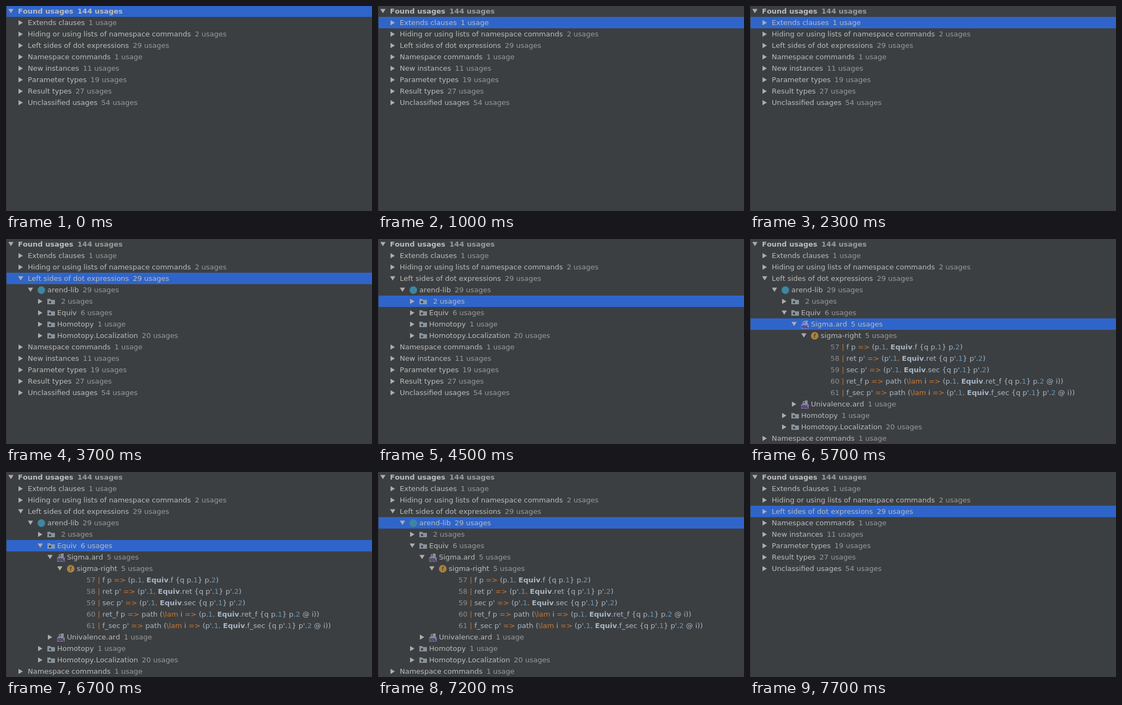
Animation, 673 px wide and 377 px high, one loop 8000 ms. Source, as an HTML page:

```html
<!DOCTYPE html>
<html lang="en">
<head>
<meta charset="utf-8">
<title>Found usages</title>
<style>
  html, body { margin: 0; width: 100%; height: 100%; overflow: hidden; background: #3c3f41; }
  #tree {
    position: absolute; inset: 0; overflow: hidden; box-sizing: border-box;
    border-left: 1px solid #323232;
    font: 13px/21px "DejaVu Sans", sans-serif; font-kerning: none;
    color: #bbb; white-space: pre;
  }
  .view { position: absolute; inset: -1px 0 0 -1px; visibility: hidden; }
  .row { position: relative; height: 21px; margin-left: 1px; }
  .row > * { position: absolute; top: 0; }
  .count { color: #999; margin-left: 3px; }
  .selected { background: #2f65ca; }
  .selected .count { color: #bbb; }
  .root { font-weight: bold; }
  svg { width: 16px; height: 21px; overflow: visible; }
  .code { color: #a9b7c6; }
  .line { color: #8c8c8c; }
  .key { color: #cc7832; }
  .num { color: #6897bb; }
</style>
</head>
<body>
<div id="tree"></div>
<script>
const LOOP = 8000;

const badge = (color, letter) =>
  `<circle cx="8" cy="11" r="7" fill="${color}"/>
   <text x="8" y="14.5" text-anchor="middle" font-size="10" fill="#2b2b2b">${letter}</text>`;

const icons = {
  library: '<circle cx="8" cy="11" r="7" fill="#3e86a0"/>',
  folder: `<path d="M1 6h5l2 2h7v8H1z" fill="#9aa7b0" fill-opacity=".8"/>
           <circle cx="6" cy="12" r="2" fill="#33383b"/>`,
  file: `<path d="M7 4 3 8h4zM8 4v5H3v2h10V4z" fill="#9aa7b0" fill-opacity=".8"/>
         <path d="M1 11h14v8H1z" fill="#b99bf8" fill-opacity=".6"/>
         <text x="8" y="17.6" text-anchor="middle" font-size="7" font-weight="bold" fill="#2b2530">IDL</text>`,
  func: badge('#aa8240', 'f'),
  record: badge('#3e86a0', 'c'),
};

// A node with a toggle key opens only while a step lists that key.
const node = (label, count, icon, kids = [], toggle = '') => ({ label, count, icon, kids, toggle });
const closed = (label, count, icon) => node(label, count, icon, [], '-');
const line = (number, code) => ({ number, code, kids: [] });

const root = node('Found usages', 144, '', [
  node('Extends clauses', 1, '', [
    node('arend-lib', 1, 'library', [
      node('', 1, 'folder', [
        node('Equiv.ard', 1, 'file', [
          node('QEquiv', 1, 'record', [
            line(47, '\\record QEquiv {A B : \\Type} \\extends Equiv {'),
          ]),
        ]),
      ]),
    ]),
  ], 'E'),
  closed('Hiding or using lists of namespace commands', 2),
  node('Left sides of dot expressions', 29, '', [
    node('arend-lib', 29, 'library', [
      closed('', 2, 'folder'),
      node('Equiv', 6, 'folder', [
        node('Sigma.ard', 5, 'file', [
          node('sigma-right', 5, 'func', [
            line(57, '| f p => (p.1, Equiv.f {q p.1} p.2)'),
            line(58, "| ret p' => (p'.1, Equiv.ret {q p'.1} p'.2)"),
            line(59, "| sec p' => (p'.1, Equiv.sec {q p'.1} p'.2)"),
            line(60, '| ret_f p => path (\\lam i => (p.1, Equiv.ret_f {q p.1} p.2 @ i))'),
            line(61, "| f_sec p' => path (\\lam i => (p'.1, Equiv.f_sec {q p'.1} p'.2 @ i))"),
          ]),
        ], 'S'),
        closed('Univalence.ard', 1, 'file'),
      ], 'Q'),
      closed('Homotopy', 1, 'folder'),
      closed('Homotopy.Localization', 20, 'folder'),
    ]),
  ], 'L'),
  closed('Namespace commands', 1),
  closed('New instances', 11),
  closed('Parameter types', 19),
  closed('Result types', 27),
  closed('Unclassified usages', 54),
]);

// start time, selected row, open toggles
const steps = [
  [0, 0, ''], [1000, 1, ''], [1400, 1, 'E'], [2300, 1, ''],
  [3200, 2, ''], [3500, 3, ''], [3700, 3, 'L'], [4200, 4, 'L'],
  [4500, 5, 'L'], [4900, 6, 'L'], [5100, 6, 'LQ'], [5600, 7, 'LQ'],
  [5700, 7, 'LQS'], [6700, 6, 'LQS'], [7000, 5, 'LQS'], [7200, 4, 'LQS'],
  [7400, 3, 'LQS'], [7700, 3, ''],
];

const highlight = code => code.replace(
  /(\\\w+|=>|\||,)|(\d)|\b(Equiv)\b/g,
  (match, key, num) => key ? `<span class="key">${key}</span>`
    : num ? `<span class="num">${num}</span>` : `<b>${match}</b>`);

const isOpen = (item, open) => !item.toggle || open.includes(item.toggle);

const flatten = (item, open, depth = 0) => [
  { item, depth },
  ...(isOpen(item, open) ? item.kids.flatMap(kid => flatten(kid, open, depth + 1)) : []),
];

const svg = (x, shapes) => `<svg style="left:${x}px">${shapes}</svg>`;

function rowHtml({ item, depth }, selected, open) {
  const x = 21 + 18 * depth;
  const textX = x + (item.icon || item.code ? 18 : 0);
  const arrow = isOpen(item, open) ? 'M.2 6.5h9.6L5 14.2z' : 'M1 6v9.4L9 10.7z';
  const body = item.code
    ? `<span class="code" style="left:${textX}px"><span class="line">${item.number}</span> ${highlight(item.code)}</span>`
    : svg(x - 18, `<path d="${arrow}" fill="#adadad"/>`)
      + (item.icon ? svg(x - 1, icons[item.icon]) : '')
      + `<span style="left:${textX}px">${item.label}<span class="count"> ${item.count} usage${item.count > 1 ? 's' : ''}</span></span>`;
  return `<div class="row${selected ? ' selected' : ''}${depth ? '' : ' root'}">${body}</div>`;
}

const tree = document.getElementById('tree');
tree.innerHTML = steps.map(([, selected, open]) =>
  `<div class="view">${flatten(root, open)
    .map((row, i) => rowHtml(row, i === selected, open)).join('')}</div>`).join('');

const views = [...tree.children];
let current = -1;

function draw() {
  const time = performance.now() % LOOP;
  const next = steps.findLastIndex(([start]) => start <= time);
  if (next !== current) {
    if (current >= 0) views[current].style.visibility = 'hidden';
    views[next].style.visibility = 'visible';
    current = next;
  }
  requestAnimationFrame(draw);
}
draw();
</script>
</body>
</html>
```
